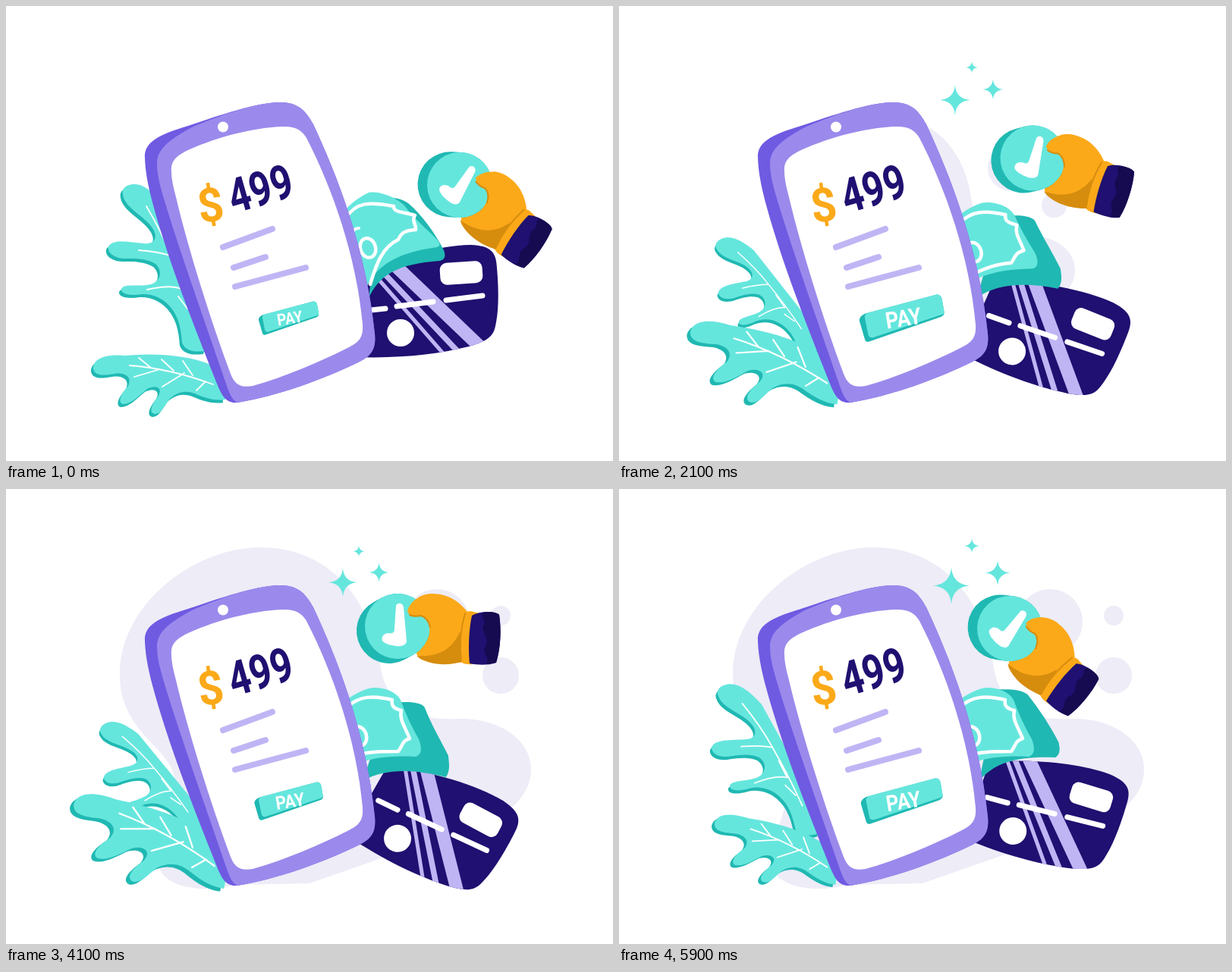
Recreate the animation shown at these times as an HTML page with a canvas. Size 800x600 px, loop 6 s.

```html
<!DOCTYPE html>
<html lang="en">
<head>
<meta charset="utf-8">
<title>Mobile payment</title>
<style>
html, body { margin: 0; width: 100%; height: 100%; overflow: hidden; background: #fff; }
canvas { display: block; }
</style>
</head>
<body>
<canvas id="stage" width="800" height="600"></canvas>
<script>
const ctx = document.getElementById('stage').getContext('2d');
const LOOP = 6000, STEP = 100;
const TEAL = '#65e6dd', TEAL_DARK = '#20b8b2', NAVY = '#1f1071', NAVY_DARK = '#160a50',
  LILAC = '#c0b5f4', PURPLE = '#9b8aec', PURPLE_DARK = '#6f5ae2',
  ORANGE = '#fba919', ORANGE_DARK = '#d68c0d', MIST = '#edecf7', WHITE = '#fff';

// Piecewise linear value over [time, value] keys
function track(t, keys) {
  for (let i = 1; i < keys.length; i++) {
    const [t0, a] = keys[i - 1], [t1, b] = keys[i];
    if (t <= t1) return a + (b - a) * (t - t0) / (t1 - t0);
  }
  return keys[keys.length - 1][1];
}

function group(x, y, scale, degrees, draw) {
  ctx.save();
  ctx.translate(x, y);
  ctx.rotate(degrees * Math.PI / 180);
  ctx.scale(scale, scale);
  draw();
  ctx.restore();
}
// Turn and scale around a pivot while drawing in stage coordinates
function around(x, y, scale, degrees, draw) {
  group(x, y, scale, degrees, () => { ctx.translate(-x, -y); draw(); });
}
function fill(d, color) {
  ctx.fillStyle = color;
  ctx.fill(new Path2D(d));
}
function stroke(d, color, width) {
  ctx.strokeStyle = color;
  ctx.lineWidth = width;
  ctx.lineCap = ctx.lineJoin = 'round';
  ctx.stroke(new Path2D(d));
}
function disc(x, y, r, color) {
  ctx.fillStyle = color;
  ctx.beginPath();
  ctx.arc(x, y, r, 0, 7);
  ctx.fill();
}
function label(text, x, y, size, degrees, narrow, color) {
  group(x, y, 1, degrees, () => {
    ctx.scale(narrow, 1);
    ctx.font = `bold ${size}px Roboto, "Liberation Sans", sans-serif`;
    ctx.textAlign = 'center';
    ctx.fillStyle = color;
    ctx.fillText(text, 0, size * 0.355);
  });
}
// Start point followed by cubic segments, blended between two poses
function morph(a, b, p) {
  const v = a.map((n, i) => n + (b[i] - n) * p);
  return `M${v.slice(0, 2)}C${v.slice(2)}`;
}

function backdrop(t) {
  const grow = Math.min(1, t / 3050);
  if (!grow) return;
  around(400, 300, grow, 0, () => {
    fill('M150 245C150 150 250 77 335 77C430 77 480 150 492 225C500 290 540 306 600 303C650 303 692 330 692 370C692 410 650 440 600 450L400 520L300 522C265 532 215 528 203 502C190 470 230 420 222 380C215 340 150 320 150 245', MIST);
    disc(568, 175, 43, MIST);
    disc(652, 167, 13, MIST);
    disc(652, 246, 24, MIST);
  });
}

function leaf(outline, veins) {
  ctx.save();
  ctx.translate(-2, 3);
  fill(outline, TEAL_DARK);
  ctx.translate(3, -4);
  fill(outline, TEAL);
  stroke(veins, WHITE, 1.8);
  ctx.restore();
}
function leaves(t) {
  const topScale = track(t, [[0, 1], [2600, .765], [3050, .725], [4100, .814], [5000, .89], [5900, .965]]);
  const topTurn = track(t, [[0, 0], [800, -6.7], [1600, -13.2], [2600, -22], [3050, -25.5], [4100, -18.8], [5000, -13.6], [5900, -8.3]]);
  around(260, 450, topScale, topTurn, () => leaf(
    'M153 250C150 238 165 233 178 238C190 243 200 255 210 270L270 430L262 456C245 458 235 455 231 445C230 430 228 412 215 397C205 385 190 380 178 381C165 383 150 382 151 374C155 366 175 372 190 368C203 364 206 350 196 341C185 334 170 334 160 334C145 335 132 328 134 318C140 308 160 312 180 314C195 316 200 306 192 294C182 278 156 268 153 250Z',
    'M184 265Q205 300 216 330Q232 370 245 415M174 323Q200 325 215 330M185 375Q215 368 230 374M230 374L222 350M238 400L226 384'));

  const lowScale = track(t, [[0, 1], [800, 1.07], [1600, 1.165], [2600, 1.25], [3700, 1.325], [4100, 1.27], [5000, 1.13], [5900, 1]]);
  const lowTurn = track(t, [[0, 0], [800, 5.4], [1600, 10.6], [2600, 15.3], [3700, 16.5], [4100, 16.1], [5000, 14.3], [5900, 13.7]]);
  around(275, 505, lowScale, lowTurn, () => leaf(
    'M114 479C114 466 130 460 155 462C190 459 225 460 258 470L285 480L288 520C275 522 262 518 250 513C235 506 222 511 214 520C207 530 203 539 195 539C186 537 192 525 200 515C206 504 196 500 185 506C175 514 165 526 153 526C145 523 152 511 160 502C166 490 155 484 142 486C130 488 116 490 114 479Z',
    'M162 475Q215 479 272 500M174 465L190 478M204 467L220 482M232 469L245 488M168 490L202 480M205 503L234 485M250 508L262 496'));
}

function card(t) {
  const turn = track(t, [[0, 0], [800, 9.8], [1600, 19.8], [2600, 32], [3080, 37.5], [4100, 32], [5000, 26.4], [5900, 21.2]]);
  around(466, 439, 1, turn, () => {
    const face = 'M458 357C515 331 570 316 612 315C640 316 646 325 647 345C650 380 649 405 645 422C642 438 630 443 610 449C570 459 520 465 462 463Z';
    fill(face, NAVY);
    ctx.save();
    ctx.clip(new Path2D(face));
    stroke('M495 325L640 464', LILAC, 17);
    stroke('M477 330L610 471', LILAC, 7.5);
    stroke('M468 334L590 474', LILAC, 5);
    ctx.restore();
    disc(520, 431, 18, WHITE);
    stroke('M472 402L500 399M515 396L563 390M580 388L628 382', WHITE, 7);
    group(600, 352, 1, -4, () => {
      ctx.fillStyle = WHITE;
      ctx.beginPath();
      ctx.roundRect(-28, -14.5, 56, 29, 9);
      ctx.fill();
    });
  });
}

function bills(t) {
  const back = track(t, [[0, 0], [800, .35], [1600, .63], [2600, 1], [3080, 1.15], [4100, .98], [5000, .67], [5900, .4]]);
  const front = Math.min(1, t / 2600);
  fill(morph(
    [478, 385, 492, 355, 515, 340, 572, 336, 580, 334, 579, 328, 577, 322, 566, 300, 548, 275, 530, 260, 522, 254, 510, 252, 495, 252],
    [470, 385, 500, 368, 540, 370, 580, 381, 586, 372, 584, 362, 583, 352, 572, 330, 560, 310, 552, 288, 545, 280, 525, 281, 505, 283], back), TEAL_DARK);
  fill(morph(
    [470, 385, 482, 345, 510, 326, 568, 318, 575, 316, 570, 310, 566, 306, 552, 292, 538, 280, 524, 262, 510, 250, 490, 244, 478, 246, 465, 252, 452, 262, 445, 272],
    [440, 372, 480, 350, 520, 352, 540, 353, 549, 350, 548, 340, 544, 330, 534, 312, 526, 295, 520, 278, 512, 264, 490, 260, 478, 263, 462, 268, 450, 276, 445, 282], front), TEAL);
  stroke(morph(
    [448, 279, 462, 258, 480, 258, 511, 264, 510, 273, 528, 272, 539, 276, 534, 283, 541, 288, 540, 295, 522, 296, 520, 302, 517, 308, 496, 318, 488, 340, 480, 367],
    [448, 289, 465, 272, 485, 272, 509, 278, 507, 288, 514, 290, 521, 292, 518, 304, 526, 314, 532, 329, 522, 332, 523, 338, 517, 346, 496, 346, 484, 346, 464, 350], front), WHITE, 4.5);
  ctx.beginPath();
  ctx.ellipse(477 - 12 * front, 319 + 7 * front, 10, 13, -.3, 0, 7);
  ctx.stroke();
  if (front < .8) stroke(`M${465 - 9 * front} ${293 + 6 * front}q-8 0 -9 9`, WHITE, 4);
}

function phone() {
  fill('M183 200C182 180 200 170 240 158C285 143 325 129 358 127C385 126 395 138 405 156C435 220 475 320 486 432C488 452 482 461 466 469C420 492 355 515 305 523C290 524 285 514 280 503C255 440 225 365 205 300C193 260 184 230 183 200', PURPLE_DARK);
  fill('M199 208C199 190 212 178 245 160C285 143 325 129 358 127C385 126 395 138 405 156C435 220 475 320 486 432C488 452 482 461 466 469C420 492 355 515 305 523C298 520 294 510 290 498C265 425 235 340 216 280C207 250 199 228 199 208', PURPLE);
  fill('M218 218C217 203 226 197 240 190C280 172 325 161 362 159C382 158 390 164 396 174C430 240 462 330 470 420C471 437 466 443 450 451C412 470 365 490 325 501C308 504 301 498 296 485C270 415 240 320 224 252C220 237 218 227 218 218', WHITE);
  disc(286, 159.5, 7, WHITE);
  label('$', 269.5, 262, 62, -9, .96, ORANGE);
  label('499', 335, 240.5, 63, -16, .79, NAVY);
  stroke('M286 318L351 294M300 345L342 331M302 370L395 345', LILAC, 8);
}

function payButton(t) {
  const scale = track(t, [[0, 1], [800, 1.16], [1600, 1.31], [2600, 1.51], [3050, 1.59], [3900, 1.11], [4100, 1.14], [5000, 1.26], [5900, 1.36]]);
  group(372, 411.5, scale, 0, () => {
    fill('M-39 3Q-40 -1 -34 -4L33 -22Q37 -22 38 -18L40 -6Q41 -3 37 -1L-30 22Q-33 23 -34 20Z', TEAL_DARK);
    fill('M-34 0Q-35 -3 -31 -5L33 -22Q37 -22 38 -18L40 -7Q41 -4 37 -3L-26 18Q-30 19 -31 15Z', TEAL);
    label('PAY', 2, 0, 21.5, -9, .88, WHITE);
  });
}

function sparkle(x, y, r) {
  group(x, y, r, 0, () => fill('M0 -1Q.08 -.08 1 0Q.08 .08 0 1Q-.08 .08 -1 0Q-.08 -.08 0 -1', TEAL));
}
function sparkles(t) {
  const scale = track(t, [[0, 0], [800, .33], [1600, .64], [2600, 1], [3050, 1.17], [3900, .755], [4100, .78], [5000, .89], [5900, 1]]);
  if (!scale) return;
  group(465, 108, scale, 0, () => {
    sparkle(-27, 19.5, 24);
    sparkle(34, 2.5, 16.5);
    sparkle(0, -33, 9.5);
  });
}

function handWithCoin(t) {
  const x = track(t, [[0, 598], [800, 579], [1600, 558], [2600, 533], [3280, 516], [5000, 516], [5900, 515]]);
  const y = track(t, [[0, 236], [800, 222.5], [1600, 209], [2600, 192], [3280, 181], [4100, 181], [5900, 184]]);
  const turn = track(t, [[0, 32], [800, 26], [1600, 18.6], [2600, 10], [3700, -3], [4100, 0], [5000, 17], [5900, 36]]);
  group(x, y, 1, turn, () => {
    ctx.translate(-516, -181);
    fill('M545 142C565 134 590 138 609 163L606 228C590 229 565 233 546 224C537 216 540 205 545 200Z', ORANGE);
    fill('M541 220C565 222 588 214 598 188L604 227C585 233 558 234 541 220', ORANGE_DARK);
    fill('M604 166Q606 161 612 161L625 164L615 231Q604 232 600 228Q597 200 604 166', ORANGE);
    stroke('M605 164Q596 195 600 227', ORANGE_DARK, 2);
    fill('M614 167C625 160 645 161 650 166C653 185 652 210 646 229C635 233 620 232 611 230C609 210 610 185 614 167', NAVY);
    fill('M629 163C640 161 648 163 650 166C653 185 652 210 646 229L633 231C639 222 627 218 632 207C639 197 624 187 630 179C633 171 624 168 629 163', NAVY_DARK);

    stroke('M505 187L516 181', TEAL_DARK, 86);
    disc(516, 181, 43, TEAL);
    fill('M514 154C516 149 523 150 524 156L528 200C528 206 521 208 514 207C506 206 499 204 496 200C494 193 500 190 505 190C510 191 512 189 512 184Z', WHITE);

    fill('M529 162C531 150 545 138 562 138C580 140 588 160 582 180C577 195 562 200 558 190C559 178 556 170 548 167C540 168 533 168 529 162', ORANGE);
    stroke('M532 166Q538 169 547 167Q556 170 559 182', ORANGE_DARK, 2);
  });
}

function frame(now) {
  const t = Math.floor(now / STEP) * STEP % LOOP;
  ctx.fillStyle = WHITE;
  ctx.fillRect(0, 0, 800, 600);
  backdrop(t);
  leaves(t);
  card(t);
  bills(t);
  phone();
  payButton(t);
  sparkles(t);
  handWithCoin(t);
}

const start = performance.now();
function tick() {
  frame(performance.now() - start);
  requestAnimationFrame(tick);
}
tick();
</script>
</body>
</html>
```
